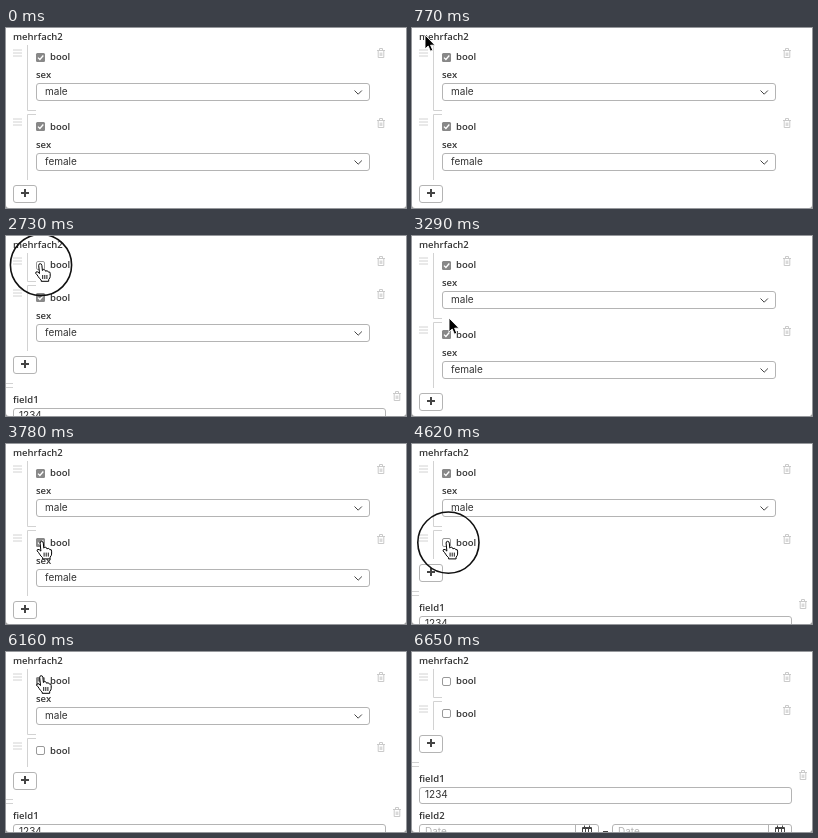
These frames come from a looping animation (400x180 px, 6790 ms). An HTML page:

```html
<!DOCTYPE html>
<html lang="en">
<head>
<meta charset="utf-8">
<title>Repeating form fields</title>
<style>
  html, body { margin: 0; width: 100%; height: 100%; overflow: hidden; background: #999; }
  svg { display: block; width: 400px; height: 180px; background: #fff; border-radius: 0 0 3px 3px; }
  text { font: 10px Inter, sans-serif; fill: #333; }
  .label { font: 600 9.5px "Open Sans", sans-serif; }
  .hint { fill: #b4b4b4; }
  .box { fill: #fff; stroke: #b4b4b4; }
  .faint { fill: none; stroke: #d2d2d2; }
  .trash { fill: none; stroke: #c4c4c4; }
  .dark { fill: none; stroke: #444; }
</style>
</head>
<body>
<svg viewBox="0 0 400 180">
  <defs>
    <path id="trash" class="trash" d="M0 2.5H8M2.5 2V.5H5.5V2M1.2 3V9.5H6.8V3M3.2 4.5V8M4.8 4.5V8" stroke-width=".9"/>
    <g id="marks">
      <path class="faint" d="M7 22H16M7 25H16M7 28H16"/>
      <rect x="30.5" y="25.5" width="8" height="8" rx="1.5" fill="#fff" stroke="#999"/>
    </g>
    <g id="check">
      <rect x="30" y="25" width="9" height="9" rx="1.5" fill="#888"/>
      <path d="M32 29.6l1.9 1.9 3.4-4" fill="none" stroke="#fff" stroke-width="1.3"/>
    </g>
    <g id="head">
      <use href="#trash" x="371" y="20"/>
      <text class="label" x="44" y="32">bool</text>
    </g>
    <g id="detail">
      <text class="label" x="30" y="50">sex</text>
      <rect class="box" x="30.5" y="55.5" width="333" height="17" rx="2.5"/>
      <path class="dark" d="M348.5 62.5l3.7 3.7 3.7-3.7"/>
    </g>
    <g id="date">
      <rect class="box" x="7.5" y="246.5" width="179" height="17" rx="2.5"/>
      <path d="M163.5 246.5V263.5" stroke="#b4b4b4"/>
      <text class="hint" x="13" y="257">Date</text>
      <path class="dark" d="M170.5 249.5H179.5V258.5H170.5ZM170.5 250.5H179.5M172.5 247.5V250M177.5 247.5V250M173.5 251V258M176.5 251V258M171 255H179"/>
    </g>
  </defs>

  <text class="label" x="7" y="12">mehrfach2</text>

  <g id="first">
    <use href="#head"/>
    <use href="#marks"/>
    <path class="faint bracket"/>
    <g class="detail">
      <use href="#check"/>
      <use href="#detail"/>
      <text x="39" y="67">male</text>
    </g>
  </g>

  <g id="second">
    <use href="#head"/>
    <use href="#marks" y="-1"/>
    <path class="faint bracket"/>
    <g class="detail">
      <use href="#check" y="-1"/>
      <use href="#detail"/>
      <text x="39" y="67">female</text>
    </g>
  </g>

  <g id="rest">
    <rect class="box" x="7.5" y="157.5" width="23" height="17" rx="2.5"/>
    <path class="dark" d="M15 165H23M19 161V169" stroke-width="2"/>
    <path class="faint" d="M0 184.5H7M0 188.5H7"/>
    <text class="label" x="7" y="204">field1</text>
    <use href="#trash" x="387" y="192"/>
    <rect class="box" x="7.5" y="209.5" width="372" height="16" rx="2.5"/>
    <text x="13" y="220">1234</text>
    <text class="label" x="7" y="241">field2</text>
    <use href="#date"/>
    <path class="dark" d="M191 253.5H196"/>
    <use href="#date" x="193"/>
  </g>

  <g id="cursor">
    <circle id="ring" r="30.6" fill="none" stroke="#111" stroke-width="1.6"/>
    <path id="arrow" d="M0 0V14L3.2 11L5.4 16.2L7.8 15.2L5.6 10.2H10Z" fill="#000" stroke="#fff" stroke-width=".9"/>
    <g id="hand" transform="translate(-1.8 -.5)" stroke="#000" stroke-linejoin="round">
      <path fill="#fff" d="M-.5 1Q-.5-.8 1-.8Q2.5-.8 2.7 1L3.2 6Q4 4.8 5.2 5.2Q6.2 5.5 6.3 6.7Q8.5 5.3 9.2 7.6Q11 6.8 11 9V12Q11 13.5 9.5 15V16.8H2V15.5Q0 14-1 12Q-2 10.3-3.5 8.8Q-3.8 6.8-1.5 7.4L.3 9Z"/>
      <path fill="none" stroke-width=".9" d="M3.5 10.5V14.5M5.6 10.5V14.5M7.7 10.5V14.5"/>
    </g>
  </g>
</svg>
<script>
  const LOOP = 6790, STEP = 70, FOLD = 37, GAP = 70;
  const $ = id => document.getElementById(id);

  const entry = { x: 75, y: 157 };
  const moves = [
    { start: 70, end: 700, x: 13, y: 7 },
    { start: 770, end: 1120, x: 35, y: 29 },
    { start: 3220, end: 3290, x: 37, y: 82 },
    { start: 3290, end: 3430, x: 36.4, y: 98.6 },
    { start: 5460, end: 6090, x: 36, y: 25 },
    { start: 6370, end: 6650, x: 22, y: -20 }
  ];
  const clicks = [
    { item: "first", down: 1610, toggle: 1820 },
    { item: "first", down: 2730, toggle: 2870 },
    { item: "second", down: 3640, toggle: 3850 },
    { item: "second", down: 4620, toggle: 4830 },
    { item: "second", down: 5250, toggle: 5460 },
    { item: "first", down: 6230, toggle: 6370 }
  ];

  const ease = k => k * k * (3 - 2 * k);
  const show = (el, on) => el.setAttribute("visibility", on ? "visible" : "hidden");
  const place = (el, x, y) => el.setAttribute("transform", `translate(${x} ${y})`);
  const isOpen = (item, t) =>
    clicks.filter(c => c.item === item && t >= c.toggle).length % 2 === 0;

  function pointerAt(t) {
    let { x, y } = entry;
    for (const m of moves) {
      const k = ease(Math.min(1, Math.max(0, (t - m.start) / (m.end - m.start))));
      x += (m.x - x) * k;
      y += (m.y - y) * k;
    }
    return [x, y];
  }

  function drawItem(item, open, y, bracket) {
    place(item, 0, y);
    show(item.querySelector(".detail"), open);
    item.querySelector(".bracket").setAttribute("d", bracket(open ? 0 : FOLD));
  }

  function drawPointer(t) {
    const [x, y] = pointerAt(t);
    const inside = t >= moves[0].start && t < moves.at(-1).end;
    const overBox = x > 28 && x < 65 && [29, 29 + GAP].some(c => Math.abs(y - c) < 7);
    $("cursor").style.display = inside ? "" : "none";
    place($("cursor"), x, y);
    show($("hand"), overBox);
    show($("arrow"), !overBox);
    show($("ring"), clicks.some(c => t >= c.down && t < c.toggle - STEP));
  }

  function draw() {
    const t = Math.floor(performance.now() % LOOP / STEP) * STEP;
    const firstOpen = isOpen("first", t), secondOpen = isOpen("second", t);
    const shift = firstOpen ? 0 : FOLD;
    drawItem($("first"), firstOpen, 0, cut => `M21.5 17V${82.5 - cut}H30`);
    drawItem($("second"), secondOpen, GAP - shift, cut => `M30 16.5H21.5V${82 - cut}`);
    place($("rest"), 0, -shift - (secondOpen ? 0 : FOLD));
    drawPointer(t);
    requestAnimationFrame(draw);
  }
  draw();
</script>
</body>
</html>
```
